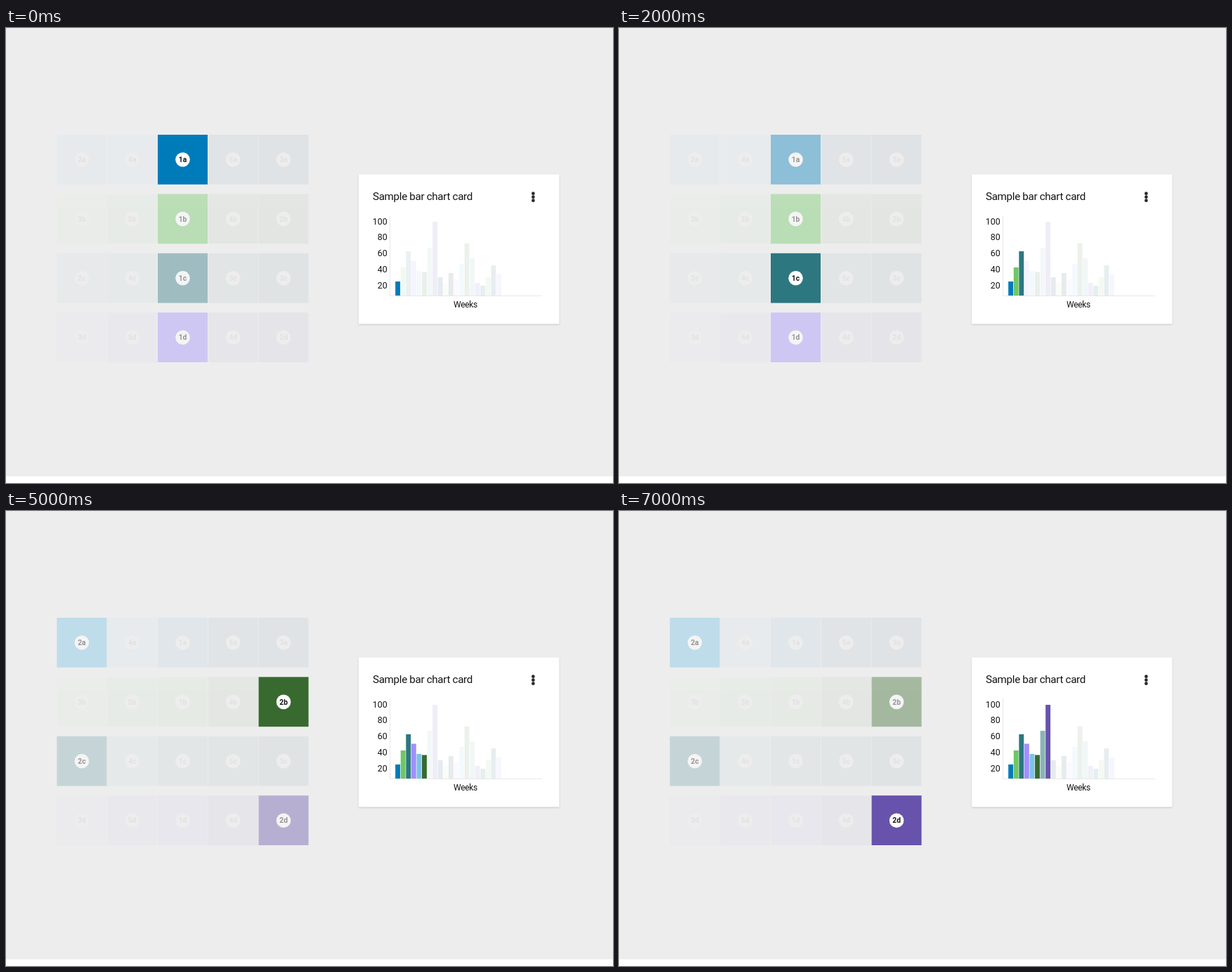
These frames come from a looping animation (864x648 px, 8000 ms). An HTML page:

```html
<!DOCTYPE html>
<html lang="en">
<head>
<meta charset="utf-8">
<style>
  html, body { margin: 0; width: 100%; height: 100%; overflow: hidden; background: #ededed; }
  svg { display: block; font-family: Roboto, sans-serif; fill: #151515; }
  .badge { font-size: 10.3px; font-weight: 700; text-anchor: middle; }
  .title { font-size: 15.2px; letter-spacing: -.33px; }
  .tick { font-size: 12.4px; text-anchor: end; }
  .axis { font-size: 12px; letter-spacing: -.3px; text-anchor: middle; }
  .card { filter: drop-shadow(0 1px 1px rgba(0, 0, 0, .16)); }
</style>
</head>
<body>
<svg id="stage" width="864" height="648" viewBox="0 0 864 648">
  <rect width="864" height="648" fill="#ededed"/>
  <rect y="638.5" width="864" height="9.5" fill="#fff"/>
  <rect class="card" x="502" y="208.5" width="285.5" height="213" fill="#fff"/>
  <text class="title" x="522" y="245">Sample bar chart card</text>
  <path d="M546.5 267V381.5H763" fill="none" stroke="#e6e8ea"/>
  <text class="axis" x="654" y="397.7">Weeks</text>
</svg>
<script>
const stage = document.getElementById('stage');
const STEP = 1000, STEPS = 8, BASE = 381;

// Columns of each row by colour number, left to right
const rows = { a: '24153', b: '35142', c: '24153', d: '35142' };
// Colours 1 to 5 of each row
const palette = {
  a: ['#007bba', '#7dc3e8', '#00405f', '#8bc9ef', '#00597a'],
  b: ['#6ec664', '#386a2f', '#c3dfb2', '#4f7a48', '#8fd08a'],
  c: ['#2d7780', '#8ab3b8', '#0f4249', '#73a9b0', '#1d5d66'],
  d: ['#a18fff', '#6753ac', '#cbc1ff', '#7868b5', '#b2a3ff']
};
const barTops = [361, 341, 318, 331.5, 346, 347.5, 313, 276, 355, 363,
                 349, 358, 336, 306.5, 328, 363, 367, 354.5, 338, 350.5];

function add(parent, tag, attrs = {}, text = '') {
  const node = document.createElementNS('http://www.w3.org/2000/svg', tag);
  for (const key in attrs) node.setAttribute(key, attrs[key]);
  node.textContent = text;
  return parent.appendChild(node);
}

const letters = Object.keys(rows);
const tiles = [];
letters.forEach((letter, row) => {
  [...rows[letter]].forEach((number, column) => {
    const x = 72.4 + column * 71.8, y = 152 + row * 84.4;
    const group = add(stage, 'g');
    add(group, 'rect', { x, y, width: 71, height: 70.8, fill: palette[letter][number - 1] });
    add(group, 'circle', { cx: x + 35.5, cy: y + 35.5, r: 10.3, fill: '#fff' });
    add(group, 'text', { class: 'badge', x: x + 35.5, y: y + 39.2 }, number + letter);
    tiles.push({ group, round: number - 1, order: (number - 1) * 4 + row });
  });
});

const bars = barTops.map((y, i) => add(stage, 'rect', {
  x: 554.2 + i * 7.57, y, width: 6.9, height: BASE - y,
  fill: palette[letters[i % 4]][i >> 2]
}));

for (let i = 0; i < 5; i++)
  add(stage, 'text', { class: 'tick', x: 542.7, y: 279.6 + i * 22.85 }, 100 - i * 20);
for (let i = -1; i <= 1; i++)
  add(stage, 'circle', { cx: 750.4, cy: 240.7 + i * 5, r: 2.35, fill: '#292929' });

function draw(time) {
  const step = Math.floor(time / STEP) % STEPS;
  for (const { group, round, order } of tiles)
    group.setAttribute('opacity', order === step ? 1 : round === step >> 2 ? .4 : .05);
  bars.forEach((bar, i) => bar.setAttribute('opacity', i <= step ? 1 : .1));
}

const start = performance.now();
function tick() {
  draw(performance.now() - start);
  requestAnimationFrame(tick);
}
tick();
</script>
</body>
</html>
```
